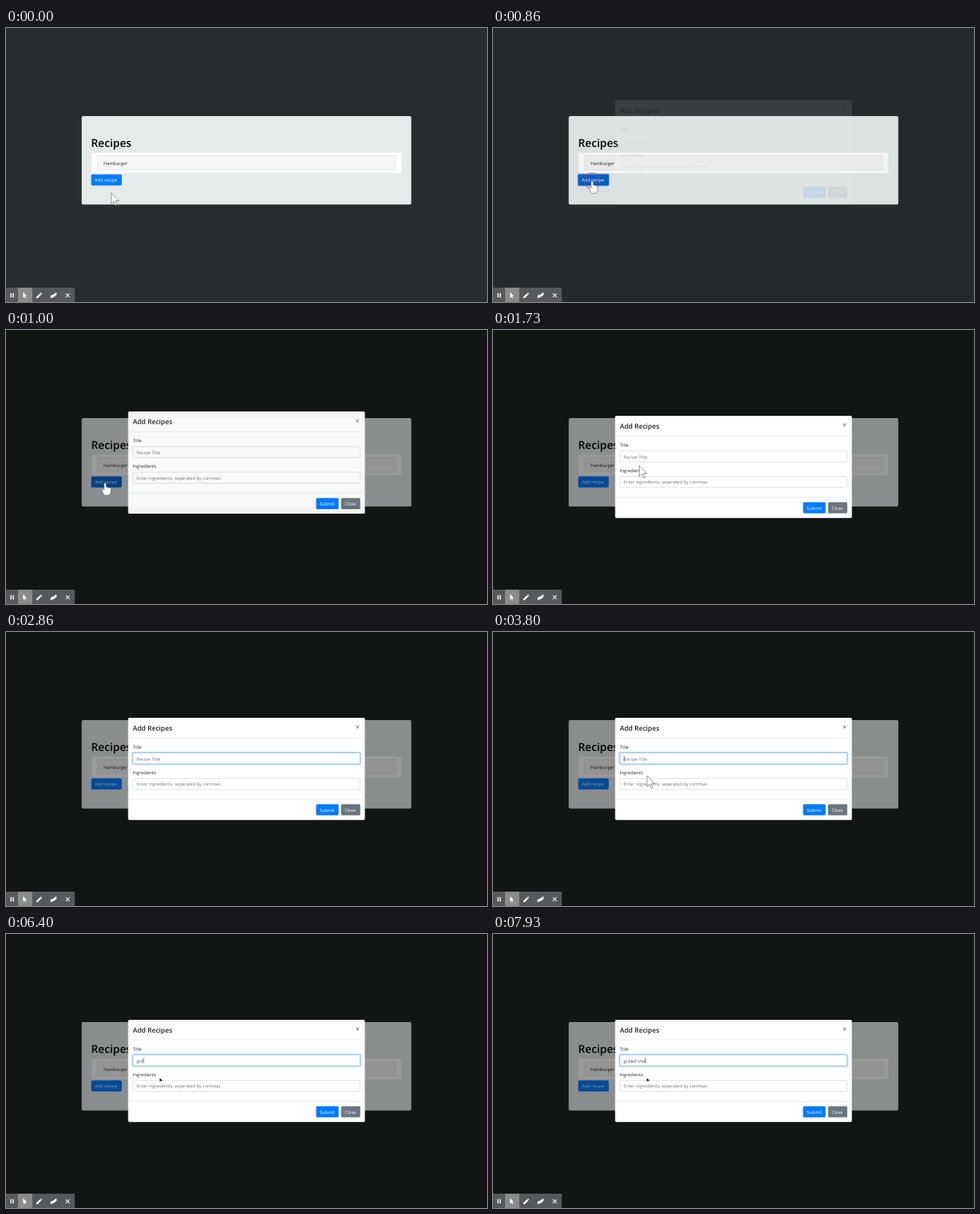
Write an HTML page that moves like this. It is 640 px wide and 364 px high and loops after 8000 ms.

```html
<!DOCTYPE html>
<html lang="en">
<head>
<meta charset="utf-8">
<title>Recipes</title>
<style>
  html, body { margin: 0; width: 100%; height: 100%; overflow: hidden; background: #272c2f; }
  svg { display: block; width: 640px; height: 364px; }
  text { font: 5.95px "Open Sans", "Noto Sans", sans-serif; fill: #212529; text-rendering: geometricPrecision; white-space: pre; }
  .h1 { font-size: 14.6px; font-weight: 600; fill: #000; }
  .h4 { font-size: 9px; font-weight: 600; }
  .btn { fill: #fff; }
  .hint { fill: #6c757d; }
  .field { fill: #fff; stroke: #ced4da; stroke-width: .7; }
  .cursor { fill: #fff; stroke: #777; stroke-width: .8; stroke-linejoin: round; }
</style>
</head>
<body>
<svg viewBox="0 0 640 364">
  <rect id="bg" width="640" height="364"/>

  <rect x="100.7" y="117" width="438.6" height="117.4" rx="2" fill="#e5ebeb"/>
  <text class="h1" x="113.3" y="158.2">Recipes</text>
  <rect x="113.5" y="165.3" width="412.7" height="28" rx="1.5" fill="#fff" stroke="#dfe3e3" stroke-width=".5"/>
  <rect x="121.8" y="169.4" width="396.6" height="19" fill="#f5f5f5" stroke="#dcdcdc" stroke-width=".6"/>
  <text x="129.8" y="182.1">Hamburger</text>
  <rect id="halo" x="112.3" y="193.3" width="42.8" height="17" rx="2.4" fill="#007bff" opacity=".5"/>
  <rect id="add" x="113.4" y="194.4" width="40.6" height="14.8" rx="1.6"/>
  <text class="btn" x="118.3" y="204.1">Add recipe</text>

  <rect id="shade" width="640" height="364"/>

  <g id="modal">
    <rect x="162.5" y="114" width="315" height="135.7" rx="1.6" fill="#fff"/>
    <text class="h4" x="168.7" y="131">Add Recipes</text>
    <path d="M465.8 124.3l3.8 3.8m0-3.8l-3.8 3.8" stroke="#555" stroke-width=".9"/>
    <path d="M162.5 140.8h315M162.5 222.2h315" stroke="#e3e6e9" stroke-width=".7"/>
    <text x="168.7" y="155">Title</text>
    <rect id="glow" x="168" y="159.8" width="304" height="16.2" rx="2" fill="none" stroke="#007bff" stroke-opacity=".3" stroke-width="1.5"/>
    <rect id="field" class="field" x="168.9" y="160.6" width="302.2" height="14.6" rx="1.5"/>
    <text id="title" x="173.8" y="170.5"></text>
    <rect id="caret" y="164.6" width=".6" height="7.2" fill="#222"/>
    <text x="168.7" y="189">Ingredients</text>
    <rect class="field" x="168.9" y="194.6" width="302.2" height="14.6" rx="1.5"/>
    <text class="hint" x="173.8" y="204.4">Enter ingredients, seperated by commas</text>
    <rect x="412.6" y="228.8" width="30" height="14.8" rx="1.6" fill="#007bff"/>
    <text class="btn" x="417.6" y="238.5">Submit</text>
    <rect x="445.8" y="228.8" width="25.6" height="14.8" rx="1.6" fill="#6c757d"/>
    <text class="btn" x="450.7" y="238.5">Close</text>
  </g>

  <circle id="ring" fill="none" stroke="#d8343c" stroke-width="1.2"/>
  <g id="cursor">
    <path id="arrow" class="cursor" d="M0 0V14.5L3.4 11.3 5.6 16.6 7.8 15.7 5.6 10.6H10.2Z"/>
    <path id="hand" class="cursor" d="M-1.4 1.2q1.3-2.2 2.6 0v4.3l5.4 1.4q1.4.6 1.2 2.2l-.8 4.4q-.4 3-3.2 3h-3.2q-1.6 0-2.6-1.6l-2.4-5q-.6-1.6 1-1.6l2 1.5z"/>
    <path id="tip" d="M-.4.2V5.2L1 4.1H3.3Z" fill="#111"/>
  </g>

  <g fill="#fff">
    <rect y="345" width="91.5" height="19" fill="#56595b"/>
    <rect x="16" y="345" width="19" height="19" fill="#8a8b8b"/>
    <path d="M5.9 352.3h1.5v5.6H5.9zM8.9 352.3h1.5v5.6H8.9z"/>
    <path d="M22.8 351v7.2l1.6-1.4 1.1 2.4 1.1-.5-1.1-2.4h2.2z"/>
    <path d="M40.4 359v-1.7l4.8-4.7 1.7 1.7-4.8 4.7zM45.7 352.1l.9-.9 1.7 1.7-.9.9z"/>
    <path d="M59.3 359v-3.6l3.2-1.2 4.7-3.2v3.8l-3.4 2.4z"/>
    <path d="M79.6 352.6l5 5m0-5l-5 5" stroke="#fff" stroke-width="1.1"/>
  </g>
</svg>
<script>
const LOOP = 8000, CLICK = 600, OPEN = 845, FOCUS = 2330, BLINK = 530;
const TEXT = "grilled che";
const KEYS = [5600, 5800, 5930, 6400, 6660, 6860, 7000, 7200, 7400, 7600, 7930];
// time, x, y of the pointer
const PATH = [[0, 140, 219], [60, 140, 219], [330, 132, 203], [1530, 132, 203],
  [1730, 194.5, 180], [2000, 206, 176], [3200, 205, 176], [3800, 205, 191], [LOOP, 205, 191]];

const el = {};
for (const node of document.querySelectorAll("[id]")) el[node.id] = node;
const set = (id, attrs) => { for (const k in attrs) el[id].setAttribute(k, attrs[k]); };
const show = (id, on) => set(id, { visibility: on ? "visible" : "hidden" });
const part = (t, start, length) => Math.min(1, Math.max(0, (t - start) / length));
const mix = (a, b, p) => a + (b - a) * p;
const blend = (a, b, p) => `rgb(${a.map((v, i) => Math.round(mix(v, b[i], p)))})`;

function pointer(t) {
  const i = PATH.findIndex(k => k[0] > t);
  const [t0, x0, y0] = PATH[i - 1], [t1, x1, y1] = PATH[i];
  const p = part(t, t0, t1 - t0);
  return [mix(x0, x1, p), mix(y0, y1, p)];
}

function drawPage(t) {
  const dim = part(t, OPEN, 150);
  const flash = t >= 5000 && t < 5200;
  set("bg", { fill: blend([39, 44, 47], flash ? [39, 39, 39] : [28, 36, 34], dim) });
  set("shade", { opacity: .4 * dim });
  const hover = t >= 200 && t < 1530, pressed = t >= CLICK && t < 1000;
  set("add", { fill: pressed ? "#0062cc" : hover ? "#0069d9" : "#007bff" });
  show("halo", pressed);
}

function drawModal(t) {
  const ease = 1 - (1 - part(t, OPEN, 300)) ** 1.7;
  set("modal", { opacity: part(t, OPEN, 165), transform: `translate(0 ${-19.7 * (1 - ease)})` });

  const focus = part(t, FOCUS, 150);
  set("glow", { opacity: focus });
  el.field.style.stroke = blend([206, 212, 218], [112, 180, 252], focus);

  const count = KEYS.filter(k => k <= t).length;
  el.title.textContent = count ? TEXT.slice(0, count) : "Recipe Title";
  el.title.style.fill = count ? "#495057" : "#6c757d";
  const last = count ? KEYS[count - 1] : FOCUS;
  set("caret", { x: 174 + (count ? el.title.getComputedTextLength() : 0) });
  show("caret", t >= FOCUS && Math.floor((t - last) / BLINK) % 2 === 0);
}

function drawPointer(t) {
  const [x, y] = pointer(t);
  const hand = t >= 230 && t < 1530, typing = t >= KEYS[0];
  set("cursor", { transform: `translate(${x} ${y})` });
  show("cursor", t < 2000 || t >= 3200);
  el.arrow.style.display = hand || typing ? "none" : "";
  el.hand.style.display = hand ? "" : "none";
  el.tip.style.display = typing ? "" : "none";

  const second = t >= FOCUS;
  const p = part(t, second ? FOCUS : CLICK, 330);
  set("ring", { cx: second ? 206 : 132, cy: second ? 171 : 203, r: 3 + 9.5 * p, opacity: 1 - p ** 4 });
  show("ring", p > 0 && p < 1);
}

function frame(now) {
  const t = now % LOOP;
  drawPage(t);
  drawModal(t);
  drawPointer(t);
  requestAnimationFrame(frame);
}
frame(0);
</script>
</body>
</html>
```
